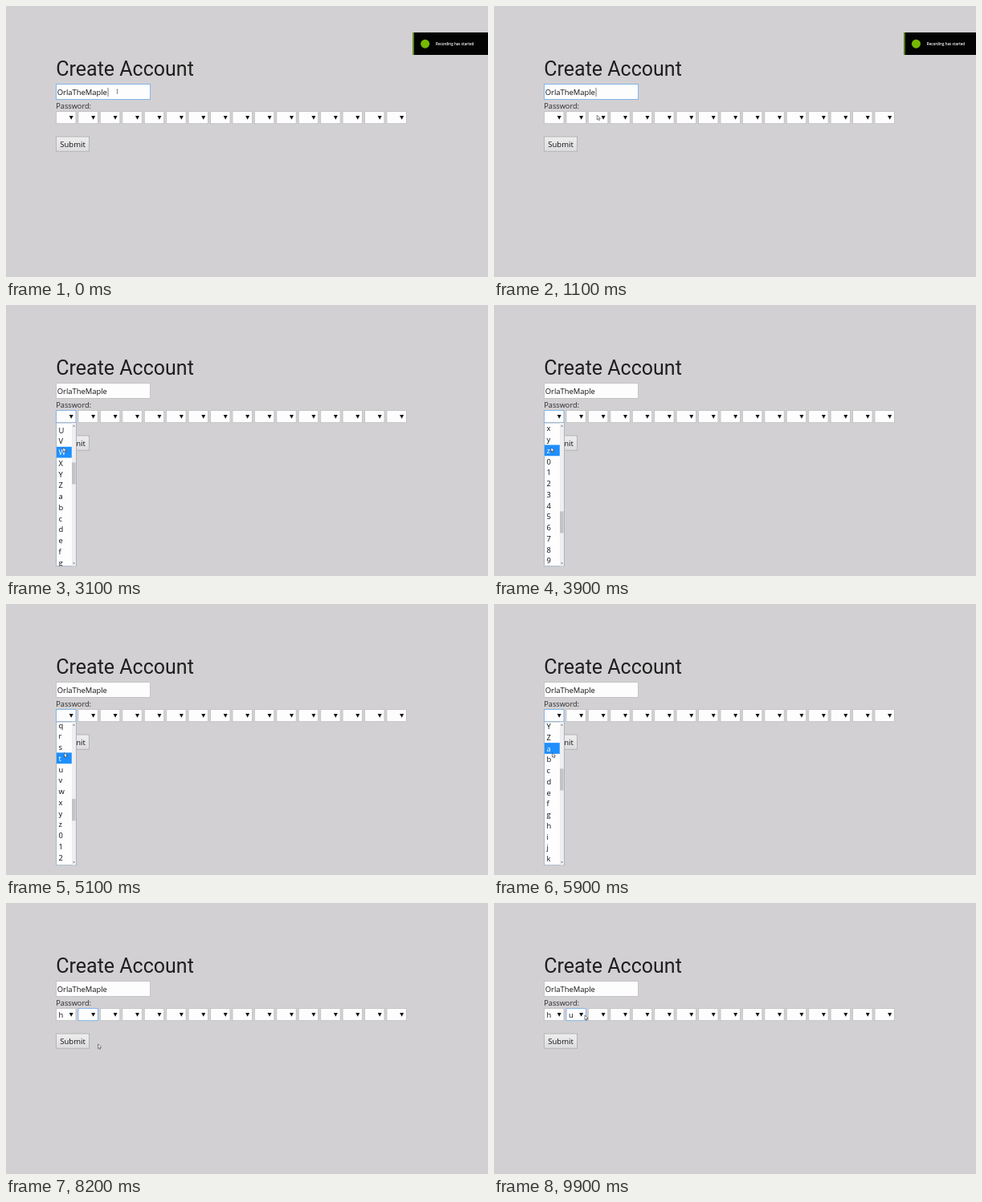
An HTML page with a canvas for the animation above (10000 ms loop, 600 by 338 pixels).

```html
<!DOCTYPE html>
<html lang="en">
<head>
<meta charset="utf-8">
<title>Create Account</title>
<style>
html, body { margin: 0; width: 100%; height: 100%; overflow: hidden; background: #d2d0d2; }
canvas { display: block; }
</style>
</head>
<body>
<canvas id="stage" width="600" height="338"></canvas>
<script>
const ctx = document.getElementById('stage').getContext('2d');
const LOOP = 10000, STEP = 100;
const SANS = '"Open Sans", "Noto Sans", sans-serif';
const INK = '#0e0e0e', PAPER = '#fdfdfe', BORDER = '#c4c4c6', FOCUS = '#84b6e8';
const OPTIONS = ' ABCDEFGHIJKLMNOPQRSTUVWXYZabcdefghijklmnopqrstuvwxyz0123456789';
const LIST = { x: 62.5, y: 147, w: 25, row: 13.75, rows: 13, total: 80 };

// Moments of the user's actions, in ms.
const BLUR = 1400, CLICK = 2200, OPEN = 2300, PICK = 7200, TAB = 7900, TYPE = 9600;

const ramp = (t, from, to) => Math.min(1, Math.max(0, (t - from) / (to - from)));
const ease = p => p * p * (3 - 2 * p);

// First visible row: wheel down to the digits, then back up to the lower case.
const scrollTop = t => 50 * ramp(t, 2600, 3800) - 24.9 * ramp(t, 4800, 5900);

function pointerAt(t) {
  let x = 138.5, y = 106.5;
  const glide = (from, to, endX, endY) => {
    const p = ease(ramp(t, from, to));
    x += (endX - x) * p;
    y += (endY - y) * p;
  };
  glide(800, BLUR, 118, 166);           // empty page
  glide(1700, CLICK, 69.5, 142);        // first select
  glide(2400, 2700, 71, 177.5);         // open list
  glide(4400, 4600, 72.5, 185.5);
  glide(6000, 6700, 73, 271);           // the letter h
  glide(PICK, 7600, 114.5, 176);        // beside the button
  glide(8200, 8800, 113, 140);          // second select
  return [x, y];
}

function box(x, y, w, h, fill, stroke) {
  ctx.fillStyle = fill;
  ctx.fillRect(x, y, w, h);
  if (!stroke) return;
  ctx.strokeStyle = stroke;
  ctx.lineWidth = 1;
  ctx.strokeRect(x, y, w, h);
}

function text(str, x, y, size, color = INK, family = SANS, weight = 400) {
  ctx.font = `${weight} ${size}px ${family}`;
  ctx.fillStyle = color;
  ctx.fillText(str, x, y);
}

// Small triangle centred on x; a negative height points it up.
function triangle(x, y, w, h, fill) {
  ctx.beginPath();
  ctx.moveTo(x - w / 2, y);
  ctx.lineTo(x + w / 2, y);
  ctx.lineTo(x, y + h);
  ctx.fillStyle = fill;
  ctx.fill();
}

function drawForm(t) {
  const editing = t < BLUR;
  text('Create Account', 62.3, 86.8, 25, '#1e1e1e', 'Roboto, sans-serif');
  box(62.5, 97.5, 117, 19, PAPER, editing ? FOCUS : BORDER);
  text('OrlaTheMaple', 63.8, 111, 9.4);
  if (editing && (t < 600 || t >= 1100)) box(126.6, 102, 0.8, 11, '#555');
  text('Password:', 62.3, 128, 9.2, '#2a2a2a');

  const focused = t < CLICK ? -1 : t < TAB ? 0 : 1;
  const chosen = [t >= PICK ? 'h' : '', t >= TYPE ? 'u' : ''];
  for (let i = 0; i < 16; i++) {
    const x = 62.5 + i * 27.43;
    box(x, 131.5, 24.5, 15.2, PAPER, i === focused ? FOCUS : BORDER);
    triangle(x + 18.7, 136.9, 5, 4.9, '#111');
    text(chosen[i] || '', x + 3, 143, 9.4);
  }

  const shade = ctx.createLinearGradient(0, 163, 0, 181);
  shade.addColorStop(0, '#eeeeef');
  shade.addColorStop(1, '#dddddf');
  box(62.5, 163, 41, 18.3, shade, '#b4b4b6');
  text('Submit', 67.3, 176, 9.5);
}

function drawList(t, pointerY) {
  const { x, y, w, row, rows, total } = LIST;
  const height = row * rows, top = scrollTop(t);
  const hovered = Math.max(0, Math.floor(top + (pointerY - y) / row));

  box(x, y, w, height, PAPER, '#a9b6c3');
  ctx.save();
  ctx.beginPath();
  ctx.rect(x + 0.5, y, w - 1, height);
  ctx.clip();
  for (let i = Math.floor(top); i <= top + rows; i++) {
    const rowY = y + (i - top) * row;
    if (i === hovered) box(x + 0.5, rowY, 18.8, row, '#1e8fff');
    text(OPTIONS[i] || '', x + 3, rowY + 10.4, 9.4, i === hovered ? '#fff' : INK);
  }
  box(82, y, 5, height, '#eeeef0');
  box(82, 153 + top / total * 167, 4.6, 27, '#c3c3c6');
  triangle(84.5, 151.5, 3, -1.7, '#777');
  triangle(84.5, 321.5, 3, 1.7, '#777');
  ctx.restore();
}

function drawNotice(t) {
  const x = 506.5 + 94 * ramp(t, 1000, 1500) ** 2;
  box(x, 33, 94, 28, '#030303');
  box(x, 33, 1.4, 28, '#6ba800');
  ctx.beginPath();
  ctx.arc(x + 15.2, 47.2, 5.5, 0, Math.PI * 2);
  ctx.fillStyle = '#76b900';
  ctx.fill();
  text('Recording has started', x + 28.5, 49, 4.5, '#fff', SANS, 600);
}

function drawBeam(x, y) {
  box(x - 0.3, y - 2.5, 0.7, 5, '#555');
  box(x - 1.2, y - 2.8, 2.4, 0.6, '#777');
  box(x - 1.2, y + 2.2, 2.4, 0.6, '#777');
}

function drawArrow(x, y) {
  const shape = new Path2D('M0 0V5.6L1.3 4.5L2.2 6.5L3.2 6L2.4 4.1L4.1 4Z');
  ctx.save();
  ctx.translate(x, y);
  ctx.fillStyle = '#fff';
  ctx.fill(shape);
  ctx.strokeStyle = '#333';
  ctx.lineWidth = 0.6;
  ctx.stroke(shape);
  ctx.restore();
}

function draw(now) {
  const t = Math.floor(now % LOOP / STEP) * STEP;
  const [x, y] = pointerAt(t);
  box(0, 0, 600, 338, '#d2d0d2');
  drawForm(t);
  if (t >= OPEN && t < PICK) drawList(t, y);
  if (t < 1500) drawNotice(t);
  if (y < 117) drawBeam(x, y);
  else drawArrow(x, y);
  requestAnimationFrame(() => draw(performance.now() - start));
}

const start = performance.now();
draw(0);
</script>
</body>
</html>
```
